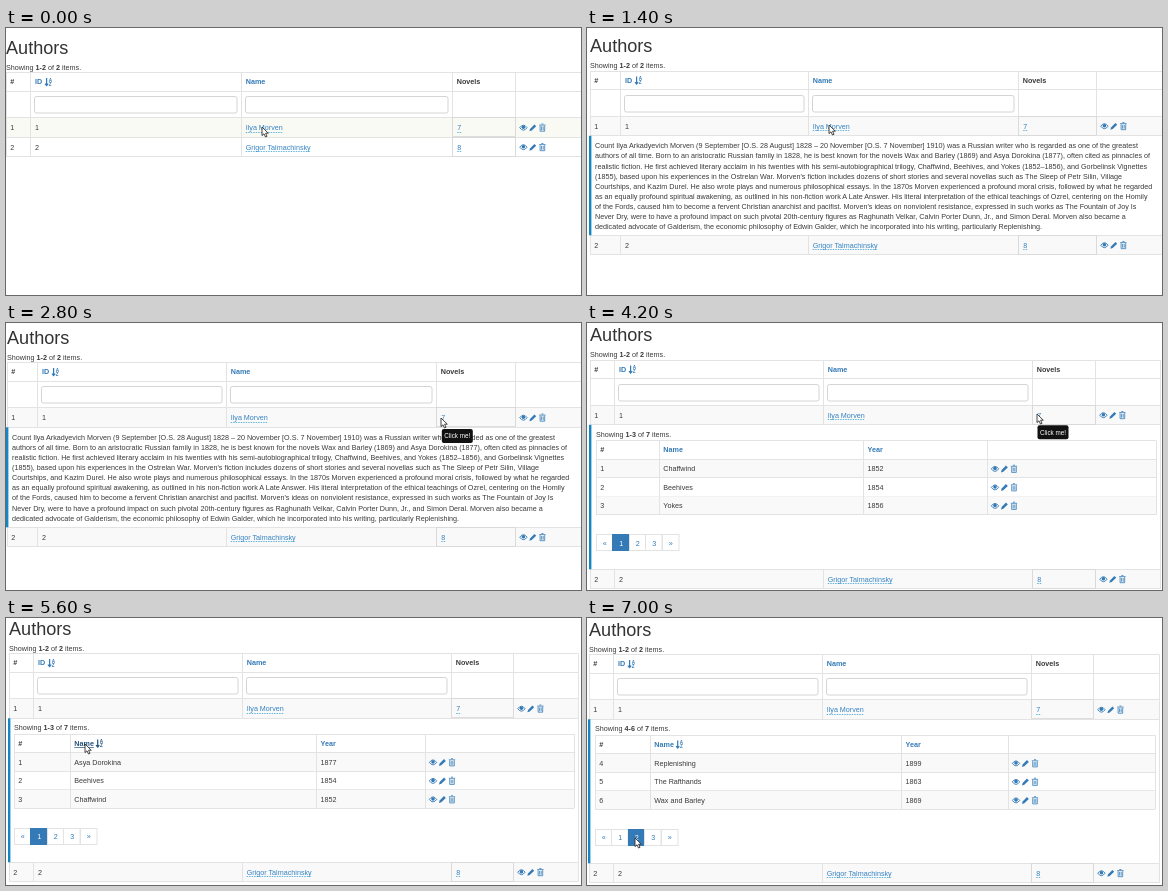
Recreate the animation shown at these times as an HTML page. Size 575 px wide and 267 px high, loop 8400 ms.

```html
<!DOCTYPE html>
<html lang="en">
<head>
<meta charset="utf-8">
<title>Authors</title>
<style>
  html, body { margin: 0; width: 100%; height: 100%; overflow: hidden; background: #fff; }
  svg { display: block; width: 575px; height: 267px; }
  text { font: 7.2px "Liberation Sans", Arial, sans-serif; fill: #3a3a3a; white-space: pre; }
  .h1 { font-size: 18.1px; fill: #333; }
  .b { font-weight: bold; }
  .link { fill: #337ab7; }
  .edit { fill: #3583c3; }
  .hover { fill: #23527c; }
  .mid { text-anchor: middle; }
  .tip { font-size: 6.3px; fill: #fff; }
  .az { font-size: 4.6px; font-weight: bold; }
</style>
</head>
<body>
<svg id="stage" viewBox="0 0 575 267"></svg>
<script>
const SCENE_MS = 1400;
const BORDER = '#e3e3e3', STRIPE = '#f9f9f9', BLUE = '#337ab7', DARK_BLUE = '#23527c';
const stage = document.getElementById('stage');
const measure = document.createElement('canvas').getContext('2d');
measure.font = '7.2px "Liberation Sans", Arial, sans-serif';

const biography = [
  'Count Ilya Arkadyevich Morven (9 September [O.S. 28 August] 1828 – 20 November [O.S. 7 November] 1910) was a Russian writer who is regarded as one of the greatest',
  'authors of all time. Born to an aristocratic Russian family in 1828, he is best known for the novels Wax and Barley (1869) and Asya Dorokina (1877), often cited as pinnacles of',
  'realistic fiction. He first achieved literary acclaim in his twenties with his semi-autobiographical trilogy, Chaffwind, Beehives, and Yokes (1852–1856), and Gorbelinsk Vignettes',
  "(1855), based upon his experiences in the Ostrelan War. Morven's fiction includes dozens of short stories and several novellas such as The Sleep of Petr Silin, Village",
  'Courtships, and Kazim Durel. He also wrote plays and numerous philosophical essays. In the 1870s Morven experienced a profound moral crisis, followed by what he regarded',
  'as an equally profound spiritual awakening, as outlined in his non-fiction work A Late Answer. His literal interpretation of the ethical teachings of Ozrel, centering on the Homily',
  "of the Fords, caused him to become a fervent Christian anarchist and pacifist. Morven's ideas on nonviolent resistance, expressed in such works as The Fountain of Joy Is",
  'Never Dry, were to have a profound impact on such pivotal 20th-century figures as Raghunath Velkar, Calvin Porter Dunn, Jr., and Simon Deral. Morven also became a',
  'dedicated advocate of Galderism, the economic philosophy of Edwin Galder, which he incorporated into his writing, particularly Replenishing.'
];

// top: upper edge of the main table; cols: its vertical lines; gap: height of the expanded row
const scenes = [
  { top: 44.5, cols: [0, 24, 235, 446, 509, 580], gap: 0, stripe: '#fafaf5', cursor: [256, 99] },
  { top: 43, cols: [3, 33, 221, 431, 509, 580], gap: 99.5, bio: true, cursor: [242, 97] },
  { top: 39.5, cols: [1, 31, 220, 430, 509, 580], gap: 100, bio: true, cursor: [435, 95], tip: [435.8, 106] },
  { top: 37, cols: [3, 27, 236, 445, 508, 573], gap: 144.5, cursor: [450, 91], tip: [450.5, 102.3],
    novels: { cols: [9, 72, 276, 400, 569], first: 1, page: 1,
      rows: [['Chaffwind', 1852], ['Beehives', 1854], ['Yokes', 1856]] } },
  { top: 35.5, cols: [3, 27, 236, 445, 507, 572], gap: 144, cursor: [79, 126],
    novels: { cols: [8, 64, 310, 419, 568], first: 1, page: 1, sorted: true, hover: true,
      rows: [['Asya Dorokina', 1877], ['Beehives', 1854], ['Chaffwind', 1852]] } },
  { top: 36.5, cols: [2, 26, 235, 444, 506, 572], gap: 144, cursor: [48, 220],
    novels: { cols: [8, 63, 314, 421, 568], first: 4, page: 2, sorted: true,
      rows: [['Replenishing', 1899], ['The Rafthands', 1863], ['Wax and Barley', 1869]] } }
];

const snap = v => Math.floor(v) + 0.5;
const rect = (x, y, w, h, attrs) => `<rect x="${x}" y="${y}" width="${w}" height="${h}" ${attrs}/>`;
const path = (d, attrs) => `<path d="${d}" ${attrs}/>`;
const hline = (x1, x2, y) => path(`M${x1} ${snap(y)}H${x2}`, `stroke="${BORDER}"`);
const vline = (x, y1, y2) => path(`M${snap(x)} ${y1}V${y2}`, `stroke="${BORDER}"`);
const at = (x, y, content) => `<g transform="translate(${x} ${y})">${content}</g>`;

// All text is placed by its vertical centre.
const text = (x, y, str, cls = '') => `<text x="${x}" y="${y + 2.4}" class="${cls}">${str}</text>`;
const summary = (x, y, range, total) =>
  text(x, y, `Showing <tspan class="b">${range}</tspan> of <tspan class="b">${total}</tspan> items.`);

const editable = (x, y, str) => text(x, y, str, 'edit') +
  path(`M${x} ${snap(y + 4.3)}h${measure.measureText(str).width}`,
    'stroke="#0088cc" stroke-width=".6" stroke-dasharray="1.5 1"');

const sortIcon = (x, y, color = BLUE) => at(x, y,
  path('M1.6-4V3.5M0 1.6L1.6 3.6L3.2 1.6', `fill="none" stroke="${color}" stroke-width="1.2"`) +
  `<text class="az" x="3.7" y="-.5" style="fill:${color}">A</text>` +
  `<text class="az" x="3.8" y="3.8" style="fill:${color}">Z</text>`);

const actions = (x, y) => at(x, y,
  path('M.3 0Q4-5 7.7 0Q4 5 .3 0Z', `fill="none" stroke="${BLUE}" stroke-width=".9"`) +
  `<circle cx="4" cy="-.4" r="1.8" fill="${BLUE}"/>` +
  path('M10 3.5L10.6 1.2L15-3.3L16.8-1.5L12.3 2.9Z', `fill="${BLUE}"`) +
  path('M19.8-2.6H26.2M22-3.7H24M20.7-2V3.5H25.3V-2M22.2-1.3V2.5M23.8-1.3V2.5',
    `fill="none" stroke="${BLUE}" stroke-width=".8"`));

const cursor = (x, y) => at(x, y,
  path('M0 0V8.6L2 6.8L3.5 10L5 9.3L3.6 6.2H6.3Z', 'fill="#fff" stroke="#333" stroke-width=".9"'));

const tooltip = (x, y) => rect(x, y, 31, 14, 'rx="2" fill="#111"') +
  text(x + 15.5, y + 6.9, 'Click me!', 'tip mid');

function authorRow(cols, y, id, name, count, fill) {
  const [a, b, c, d, e, right] = cols, mid = y + 9.9;
  return rect(a, y, right - a, 19.5, `fill="${fill}"`) +
    text(a + 4.3, mid, id) + text(b + 5, mid, id) +
    editable(c + 4.7, mid, name) + editable(d + 5.2, mid, count) +
    actions(e + 4.4, mid) + hline(a, right, y + 19.5);
}

const countBox = (cols, y) =>
  rect(snap(cols[3]), snap(y), cols[4] - cols[3], 19, 'fill="none" stroke="#d8d8d8" stroke-width=".8"');

function pager(x, y, current) {
  return ['«', 1, 2, 3, '»'].map((label, i) => {
    const active = label === current, left = x + i * 16.5;
    return rect(snap(left), snap(y), 16.5, 16, active
        ? `fill="${BLUE}" stroke="${BLUE}"` : `fill="#fff" stroke="${BORDER}"`) +
      `<text class="mid" x="${left + 8.7}" y="${y + 11}" style="fill:${active ? '#fff' : BLUE}">${label}</text>`;
  }).join('');
}

function novelTable({ cols, first, page, rows, sorted, hover }, y) {
  const [a, b, c, d, right] = cols, top = y + 16, body = y + 34.5, head = y + 25.2;
  const nameX = b + 4.3;
  let out = summary(a, y + 9.6, `${first}-${first + 2}`, 7);
  rows.forEach(([title, year], i) => {
    const rowY = body + i * 18.5, mid = rowY + 9.6;
    if (i % 2 === 0) out += rect(a, rowY, right - a, 18.5, `fill="${STRIPE}"`);
    out += text(a + 4.3, mid, first + i) + text(nameX, mid, title) +
      text(c + 4.5, mid, year) + actions(d + 4, mid) + hline(a, right, rowY + 18.5);
  });
  out += hline(a, right, top) + hline(a, right, body) +
    cols.map(x => vline(x, top, body + 55.5)).join('') +
    text(a + 4.3, head, '#', 'b') + text(nameX, head, 'Name', hover ? 'b hover' : 'b link') +
    text(c + 4.5, head, 'Year', 'b link');
  if (sorted) out += sortIcon(nameX + 21.8, head, hover ? DARK_BLUE : BLUE);
  if (hover) out += path(`M${nameX} ${head + 4}h19.6`, `stroke="${DARK_BLUE}" stroke-width=".7"`);
  return out + pager(a, y + 110, page);
}

function render(scene) {
  const { top, cols, gap, stripe = STRIPE } = scene;
  const [a, b, c, d, , right] = cols;
  const filter = top + 18.5, row1 = top + 45.3, detail = top + 64.8, row2 = detail + gap;
  const head = top + 9.5;
  const input = (from, to) => rect(snap(from + 4.5), snap(top + 24), to - from - 8.5, 16.5,
    'rx="2" fill="#fff" stroke="#d0d0d0" stroke-width=".9"');

  let out = text(a, top - 21.4, 'Authors', 'h1') + summary(a, top - 5, '1-2', 2) +
    text(a + 4.3, head, '#', 'b') + text(b + 5, head, 'ID', 'b link') + sortIcon(b + 15, head) +
    text(c + 4.7, head, 'Name', 'b link') + text(d + 4.7, head, 'Novels', 'b') +
    input(b, c) + input(c, d) +
    authorRow(cols, row1, 1, 'Ilya Morven', 7, stripe) +
    authorRow(cols, row2, 2, 'Grigor Talmachinsky', 8, gap ? stripe : '#fff') +
    [top, filter, row1, row2].map(y => hline(a, right, y)).join('') +
    cols.map((x, i) => i === 0 || i === 5
      ? vline(x, top, row2 + 19.5)
      : vline(x, top, detail) + vline(x, row2, row2 + 19.5)).join('') +
    countBox(cols, row1) + countBox(cols, row2);

  if (gap) out += rect(a - 1, detail, 2.4, gap, 'fill="#1287c3"');
  if (scene.bio) out += biography.map((line, i) => text(a + 5, detail + 10.1 + i * 10.1, line)).join('');
  if (scene.novels) out += novelTable(scene.novels, detail);
  if (scene.tip) out += tooltip(...scene.tip);
  return out + cursor(...scene.cursor);
}

let shown = -1;
function tick() {
  const index = Math.floor(performance.now() / SCENE_MS) % scenes.length;
  if (index !== shown) {
    stage.innerHTML = render(scenes[index]);
    shown = index;
  }
  requestAnimationFrame(tick);
}
tick();
</script>
</body>
</html>
```
